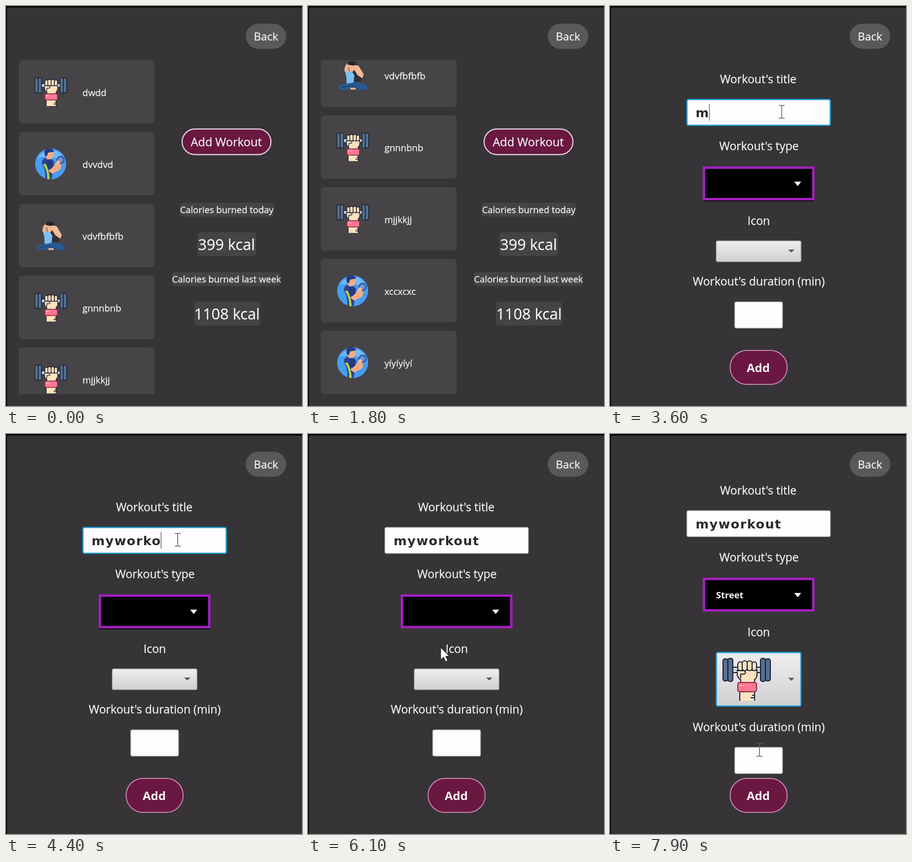
Animation, 600 px wide and 813 px high, one loop 8000 ms. Source, as an HTML page:

```html
<!DOCTYPE html>
<html lang="en">
<head>
<meta charset="utf-8">
<title>Workout tracker</title>
<style>
  html, body { margin: 0; width: 100%; height: 100%; overflow: hidden; background: #363436; }
  svg { display: block; width: 600px; height: 813px; }
  text { font: 23.1px "Open Sans", "Noto Sans", sans-serif; fill: #f5f4f5; stroke: #f5f4f5; stroke-width: .3; white-space: pre; }
  .mid { text-anchor: middle; }
  .small { font-size: 18.4px; }
  .row { font-size: 18.6px; }
  .big { font-size: 30.7px; }
  .bold { font-weight: 700; stroke: none; }
  .typed { font: 700 25.6px "DejaVu Sans", sans-serif; letter-spacing: 1.4px; fill: #2c2a2c; stroke: none; }
  .chip { fill: #454345; }
  .card { fill: #464446; }
  .card.hover { fill: #504e50; }
  .field { fill: #fffdff; stroke: #c4c2c4; stroke-width: 1.5; }
  .focus { stroke: #1c9bd3; stroke-width: 2.5; }
  .wine { fill: #6a1742; }
</style>
</head>
<body>
<svg viewBox="0 0 600 813" xmlns="http://www.w3.org/2000/svg">
  <defs>
    <clipPath id="view"><rect x="26" y="110" width="275" height="679"/></clipPath>
    <linearGradient id="silver" x2="0" y2="1">
      <stop stop-color="#efedef"/><stop offset="1" stop-color="#d1cfd1"/>
    </linearGradient>

    <g id="lift" stroke="#161a28" stroke-width="2" stroke-linejoin="round">
      <path d="M21 19h56v11h-56z" fill="#c5d6f2"/>
      <g fill="#556f90">
        <rect x="1" y="2" width="10" height="45" rx="4"/><rect x="11" y="1" width="10" height="47" rx="4"/>
        <rect x="77" y="1" width="10" height="47" rx="4"/><rect x="87" y="2" width="10" height="45" rx="4"/>
      </g>
      <g fill="#fde2bf">
        <path d="M35 70h30v17h-30z" stroke="none"/>
        <path d="M35 70v17M65 70v17M65 76h-5M65 81h-8" fill="none"/>
        <path d="M30 25h40v8q0 8-5 11v6h-28v-6q-8-4-7-13z"/>
        <rect x="31" y="8" width="10" height="18" rx="5"/><rect x="40" y="6" width="10" height="20" rx="5"/>
        <rect x="50" y="6" width="10" height="20" rx="5"/><rect x="60" y="8" width="9" height="18" rx="4.5"/>
        <path d="M29 26h15q5 4 0 7h-7v8" />
      </g>
      <rect x="31" y="50" width="38" height="19" rx="4" fill="#fa7891" stroke="#8b2440"/>
      <path d="M36 56h3M42 56h2" stroke="#fff"/>
    </g>

    <g id="curl">
      <circle cx="33" cy="33" r="31.5" fill="#479df2"/>
      <path d="M8 20a29 29 0 0 1 30-15q20 3 22 24l-26-12z" fill="#72bdfb"/>
      <path d="M15 32q0-9 9-12l10 2 6 6-2 18-3 18-13-1q2-17-7-31z" fill="#304394"/>
      <path d="M22 9h16l1 8-4 6-9 1-3-5z" fill="#f2ad85"/>
      <path d="M20 8q2-8 11-7 8 1 9 7l-12 2-3 8-4-2z" fill="#263d80"/>
      <path d="M17 33h6q7 13 8 31h-5q1-19-9-31z" fill="#b9db31"/>
      <path d="M31 39l8-1 9-13 7 5-2 14-16 9-8-5z" fill="#f2ad85"/>
      <path d="M25 26q7-5 12 3l1 10-7 6q-8-8-6-19z" fill="#283a80"/>
      <circle cx="53" cy="25" r="8.5" fill="#3d5ca6"/><circle cx="53" cy="25" r="5" fill="#7399d2"/>
      <path d="M44 29l4-4 5 5-5 5z" fill="#f7bc97"/>
    </g>

    <g id="yoga">
      <path d="M29 24l10-3 12 11-4 12-13-1z" fill="#302e36"/>
      <path d="M34 8l9 3 10 17-3 8-10-7-7-12z" fill="#f3ba95"/>
      <path d="M14 22q-1-15 11-19l5 4-8 7 1 9z" fill="#efb28a"/>
      <path d="M23 9h11l1 8-5 6h-6z" fill="#f0b48c"/>
      <path d="M20 8q1-8 10-7 9 1 8 8l-8 1z" fill="#24242d"/>
      <path d="M15 22h14l5 8-2 18h-14q1-14-3-26z" fill="#7cc0f0"/>
      <path d="M2 52q8-6 22-6l14-3q16 2 22 9 3 7-4 7h-48q-8-1-6-7z" fill="#285990"/>
      <path d="M7 55q16-6 27-1l8 3" fill="none" stroke="#1a4272" stroke-width="1.5"/>
      <path d="M26 55h11l-1 4h-10z" fill="#eab08a"/>
    </g>
  </defs>

  <rect width="600" height="813" fill="#363436"/>
  <path d="M0 0h600v3h-598v810h-2z"/>
  <rect x="486" y="36" width="82" height="51" rx="25.5" fill="#5a585a"/>
  <text class="mid" x="527" y="69.5" style="font-size:22.4px">Back</text>

  <g id="home">
    <g clip-path="url(#view)"><g id="list"></g></g>
    <rect class="wine" x="357" y="250" width="180" height="52" rx="26" stroke="#dccbd5" stroke-width="2.4"/>
    <text class="mid" x="446.5" y="285" style="font-size:23.6px">Add Workout</text>
    <rect class="chip" x="352" y="400" width="191" height="28" rx="6"/>
    <text class="mid small" x="447.5" y="421">Calories burned today</text>
    <rect class="chip" x="388" y="460" width="119" height="48" rx="6"/>
    <text class="mid big" x="447" y="495.5">399 kcal</text>
    <rect class="chip" x="336" y="541" width="221" height="28" rx="6"/>
    <text class="mid small" x="447" y="562">Calories burned last week</text>
    <rect class="chip" x="381" y="601" width="134" height="48" rx="6"/>
    <text class="mid big" x="448" y="636.5">1108 kcal</text>
  </g>

  <g id="form">
    <g id="upper">
      <text class="mid" x="300.5" y="157">Workout's title</text>
      <rect id="title" class="field" x="156" y="190" width="290.5" height="52.5" rx="3"/>
      <text id="typed" class="typed" x="173.5" y="226"></text>
      <path id="caret" d="M0 199v34" stroke="#8b898b" stroke-width="2"/>
      <text class="mid" x="302" y="293">Workout's type</text>
      <path id="shade" d="M189 396h225" stroke="#0a090a" stroke-width="2"/>
      <rect x="190.5" y="328.5" width="221.5" height="64" stroke="#a21fbd" stroke-width="5"/>
      <path d="M373.5 357h14l-7 9z" fill="#fff"/>
      <text id="kind" class="bold" x="215" y="367.5" style="font-size:18.3px">Street</text>
      <text class="mid" x="301.5" y="445">Icon</text>
    </g>
    <rect id="picker" x="215.5" width="171.5" rx="3" fill="url(#silver)" stroke="#b4b2b4" stroke-width="1.5"/>
    <path id="arrow" d="M361 -3h13l-6.5 6z" fill="#5b595b"/>
    <use id="chosen" href="#lift" x="228" y="455"/>
    <g id="lower">
      <text class="mid" x="301.5" y="568">Workout's duration (min)</text>
      <rect class="field" x="253" y="601.5" width="96.5" height="53" rx="3"/>
    </g>
    <rect class="wine" x="243.5" y="700" width="115.5" height="69" rx="34" stroke="#c987b4" stroke-width="2"/>
    <text class="mid bold" x="300.5" y="743.5" style="font-size:24px">Add</text>
    <path id="pointer" d="M0 0v24.500l5.800-5.200 4 9.200 4.200-1.800-4-9h7.500z" fill="#fff" stroke="#1c1b1c"/>
    <path id="beam" d="M-6-13h4q2 0 2 2v22q0 2-2 2h-4M6-13h-4q-2 0-2 2M6 13h-4q-2 0-2-2" fill="none" stroke="#5d5b5d" stroke-width="1.5"/>
  </g>
</svg>

<script>
const LOOP = 8000, STEP = 100, PITCH = 146, TOP = 110;
const OPEN = 2300, CLICK = 3200, TYPE = 3600, KEY = 130, BLUR = 5600, KIND = 6300, PICK = 6800;
const WORD = "myworkout";
const rows = [["dwdd", "lift"], ["dvvdvd", "curl"], ["vdvfbfbfb", "yoga"], ["gnnnbnb", "lift"],
  ["mjjkkjj", "lift"], ["xccxcxc", "curl"], ["yíyíyíyí", "curl"]];

// [time, value...]
const scrollKeys = [[0, 0], [900, 147], [1700, 326]];
const mouseKeys = [[2300, 440, 284], [2600, 412, 305], [2800, 410, 300], [3200, 348, 215],
  [5100, 348, 215], [5500, 340, 362], [5800, 336, 364], [6100, 269, 434], [6300, 269, 436],
  [6500, 320, 494], [6800, 288, 590], [7300, 296, 626], [7900, 303, 642]];

const $ = id => document.getElementById(id);
const show = (id, on) => $(id).setAttribute("visibility", on ? "inherit" : "hidden");
const move = (id, x, y) => $(id).setAttribute("transform", `translate(${x} ${y})`);

function track(keys, t) {
  const next = keys.findIndex(k => k[0] > t);
  if (next === 0) return keys[0].slice(1);
  if (next < 0) return keys[keys.length - 1].slice(1);
  const a = keys[next - 1], b = keys[next], p = (t - a[0]) / (b[0] - a[0]);
  return a.slice(1).map((v, i) => v + (b[i + 1] - v) * p);
}

$("list").innerHTML = rows.map(([name, icon], i) => {
  const art = icon === "lift" ? 'transform="translate(58 35) scale(.67)"'
    : `x="${icon === "curl" ? 57.5 : 60}" y="${icon === "curl" ? 32 : 35}"`;
  return `<g transform="translate(0 ${TOP + i * PITCH})">
    <rect class="card" x="26" width="275" height="129" rx="7"/>
    <use href="#${icon}" ${art}/><text class="row" x="155" y="73">${name}</text></g>`;
}).join("");
const cards = [...document.querySelectorAll(".card")];

function drawHome(t) {
  const [scroll] = track(scrollKeys, t);
  move("list", 0, -Math.round(scroll));
  const over = t >= 200 && t < 1500 ? Math.floor((465 - TOP + scroll) / PITCH) : -1;
  cards.forEach((card, i) => card.classList.toggle("hover", i === over));
}

function drawForm(t) {
  const picked = t >= PICK, focused = t < BLUR;
  const count = t < TYPE ? 0 : Math.min(WORD.length, Math.floor((t - TYPE) / KEY) + 1);
  const lastInput = count ? TYPE + (count - 1) * KEY : t >= CLICK ? CLICK : OPEN;

  $("typed").textContent = WORD.slice(0, count);
  $("title").classList.toggle("focus", focused);
  show("caret", focused && (t - lastInput) % 1000 < 500);
  move("caret", 173.5 + (count ? $("typed").getComputedTextLength() : 0), 0);
  show("shade", focused);
  show("kind", t >= KIND);

  // The chosen icon makes its box taller and pushes the rest apart.
  move("upper", 0, picked ? -34 : 0);
  move("lower", 0, picked ? 35.5 : 0);
  $("picker").setAttribute("y", picked ? 444 : 477.5);
  $("picker").setAttribute("height", picked ? 109 : 42);
  $("picker").classList.toggle("focus", t >= 6500);
  move("arrow", 0, picked ? 498.5 : 498);
  show("chosen", picked);

  const [x, y] = track(mouseKeys, t);
  const inTitle = x > 156 && x < 447 && y > 190 && y < 243;
  const inTime = picked && x > 253 && x < 350 && y > 636 && y < 690;
  const beam = inTitle || inTime;
  show("beam", beam);
  show("pointer", !beam);
  move(beam ? "beam" : "pointer", x, y);
}

function draw() {
  const t = Math.floor(performance.now() % LOOP / STEP) * STEP;
  const home = t < OPEN;
  show("home", home);
  show("form", !home);
  home ? drawHome(t) : drawForm(t);
  requestAnimationFrame(draw);
}
draw();
</script>
</body>
</html>
```
